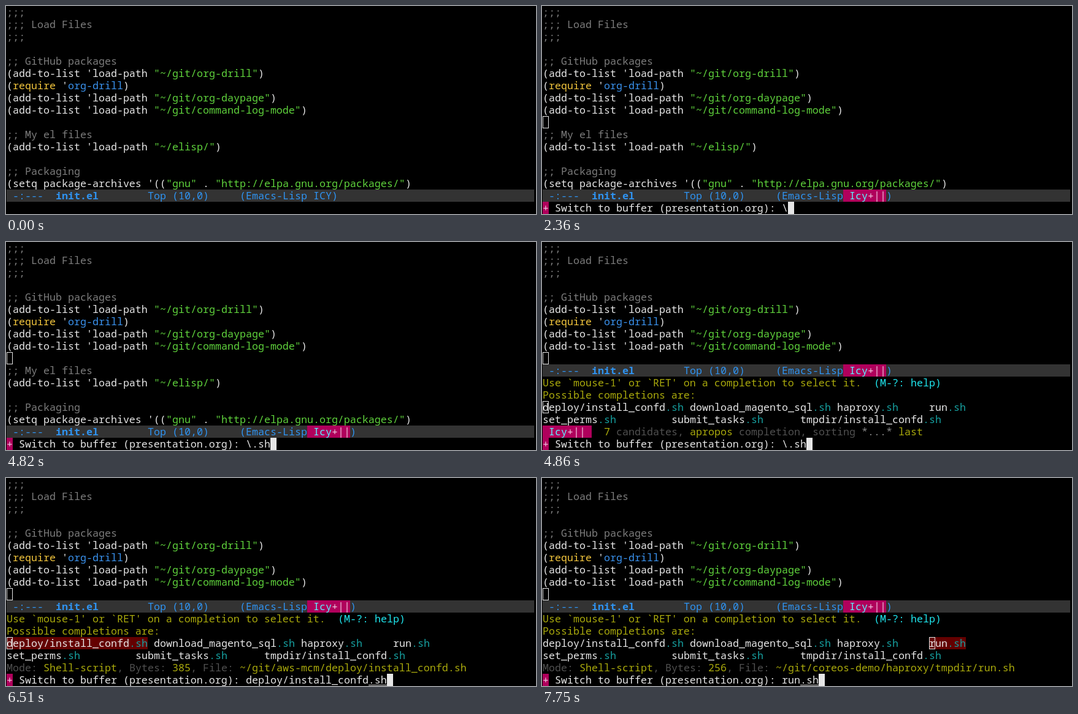
Write an HTML page with a canvas that moves like this. It is 864 px wide and 340 px high and loops after 8 s.

```html
<!DOCTYPE html>
<html lang="en">
<head>
<meta charset="utf-8">
<title>Switch to buffer</title>
<style>
  html, body { margin: 0; width: 100%; height: 100%; overflow: hidden; background: #000; }
  canvas { display: block; }
</style>
</head>
<body>
<canvas id="stage" width="864" height="340"></canvas>
<script>
const ctx = document.getElementById('stage').getContext('2d');
const CW = 10, LH = 20, LEFT = 1, COLS = 86, LOOP = 8000;
const FONT = '16.667px "Noto Sans Mono", "DejaVu Sans Mono", monospace';

const C = {
  fg: '#e6e6e6', note: '#7c7c7c', str: '#5fd23c', key: '#f2c53d', sym: '#3a92ee',
  bar: '#333333', blue: '#2f93f0', pink: '#b0005c', icy: '#5ff0ff', plus: '#f0c8e2',
  olive: '#a9a90c', dim: '#505050', grey: '#8a8a8a', cyan: '#1fe6ee', ext: '#16a0a0', hit: '#640000'
};

const x = col => LEFT + col * CW;

function box(col, row, cols, color) {
  ctx.fillStyle = color;
  ctx.fillRect(x(col), row * LH, cols * CW, LH);
}

function hollow(col, row) {
  ctx.strokeStyle = C.fg;
  ctx.lineWidth = 1;
  ctx.strokeRect(x(col) + .5, row * LH + .5, CW - 1, LH - 1);
}

// Alternating color name and text, starting at a cell; returns the next column.
function put(col, row, ...runs) {
  for (let i = 0; i < runs.length; i += 2) {
    const text = runs[i + 1];
    ctx.fillStyle = C[runs[i]];
    ctx.fillText(text, x(col), row * LH + 16);
    col += text.length;
  }
  return col;
}

function loadPath(row, path) {
  put(0, row, 'fg', "(add-to-list 'load-path ", 'str', `"${path}"`, 'fg', ')');
}

function source() {
  [[0, ';;;'], [1, ';;; Load Files'], [2, ';;;'], [4, ';; GitHub packages']]
    .forEach(([row, s]) => put(0, row, 'note', s));
  loadPath(5, '~/git/org-drill');
  put(0, 6, 'fg', '(', 'key', 'require', 'fg', " '", 'sym', 'org-drill', 'fg', ')');
  loadPath(7, '~/git/org-daypage');
  loadPath(8, '~/git/command-log-mode');
}

function sourceTail() {
  put(0, 10, 'note', ';; My el files');
  loadPath(11, '~/elisp/');
  put(0, 13, 'note', ';; Packaging');
  put(0, 14, 'fg', "(setq package-archives '((", 'str', '"gnu"', 'fg', ' . ',
    'str', '"http://elpa.gnu.org/packages/"', 'fg', ')');
}

function modeLine(row, active) {
  box(0, row, COLS, C.bar);
  put(1, row, 'blue', '-:---');
  ctx.font = 'bold ' + FONT;
  put(8, row, 'blue', 'init.el');
  ctx.font = '300 ' + FONT;
  put(23, row, 'blue', 'Top (10,0)');
  const col = put(38, row, 'blue', '(Emacs-Lisp');
  if (!active) return put(col, row, 'blue', ' ICY)');
  badge(col, row, 7);
  put(col + 7, row, 'blue', ')');
}

function badge(col, row, cols) {
  box(col, row, cols, C.pink);
  put(col + 1, row, 'icy', 'Icy', 'plus', '+||');
}

const files = [
  [0, 13, 'deploy/install_confd'], [24, 13, 'download_magento_sql'], [48, 13, 'haproxy'],
  [63, 13, 'run'], [0, 14, 'set_perms'], [21, 14, 'submit_tasks'], [42, 14, 'tmpdir/install_confd']
];
const info = [
  ['385', 'aws-mcm/deploy/install_confd'],
  ['807', 'aws-mcm/mysql/download_magento_sql'],
  ['94', 'coreos-demo/haproxy/tmpdir/haproxy'],
  ['256', 'coreos-demo/haproxy/tmpdir/run']
];

function completions(pick) {
  put(0, 11, 'olive', "Use `mouse-1' or `RET' on a completion to select it.  ", 'cyan', '(M-?: help)');
  put(0, 12, 'olive', 'Possible completions are:');
  files.forEach(([col, row, name], i) => {
    if (i === pick) box(col, row, name.length + 3, C.hit);
    put(col, row, 'fg', name, 'ext', '.sh');
  });
  hollow(files[Math.max(pick, 0)][0], 13);
  if (pick < 0) {
    badge(0, 15, 8);
    put(10, 15, 'olive', '7', 'dim', ' candidates, ', 'olive', 'apropos', 'dim', ' completion, sorting ',
      'grey', '*...* ', 'olive', 'last');
  } else {
    const [bytes, path] = info[pick];
    put(0, 15, 'dim', 'Mode: ', 'olive', 'Shell-script', 'dim', ', Bytes: ', 'olive', bytes,
      'dim', ', File: ', 'olive', `~/git/${path}.sh`);
  }
}

function prompt(input, pick, cursor) {
  box(0, 16, 1, C.pink);
  let col = put(0, 16, 'plus', '+', 'fg', ' Switch to buffer (presentation.org): ');
  if (pick >= 0) {
    col = put(col, 16, 'fg', files[pick][2] + '.sh');
    ctx.fillRect(x(col - 3), 338, 3 * CW, 1);
  } else {
    col = put(col, 16, 'fg', input);
  }
  if (cursor) box(col, 16, 1, C.fg);
}

// Keystrokes: time, input, candidate (-1 list only, -2 no list)
const keys = [
  [1560, '', -2], [2360, '\\', -2], [2890, '\\.', -2], [3180, '\\.s', -2], [3430, '\\.sh', -2],
  [4830, '\\.sh', -1], [6510, '', 0], [6920, '', 1], [7330, '', 2], [7720, '', 3]
];
const BLINK = 495;

function draw(t) {
  ctx.fillStyle = '#000';
  ctx.fillRect(0, 0, 864, 340);
  ctx.font = '300 ' + FONT;
  source();
  const key = keys.filter(k => k[0] <= t).pop();
  if (!key) {
    sourceTail();
    modeLine(15, false);
    if (t >= 460) box(0, 9, 1, C.fg);
    return;
  }
  const [since, input, pick] = key;
  hollow(0, 9);
  if (pick === -2) {
    sourceTail();
    modeLine(15, true);
  } else {
    modeLine(10, true);
    completions(pick);
  }
  prompt(input, pick, Math.floor((t - since) / BLINK) % 2 === 0);
}

const start = performance.now();
function tick() {
  draw((performance.now() - start) % LOOP);
  requestAnimationFrame(tick);
}
tick();
</script>
</body>
</html>
```
